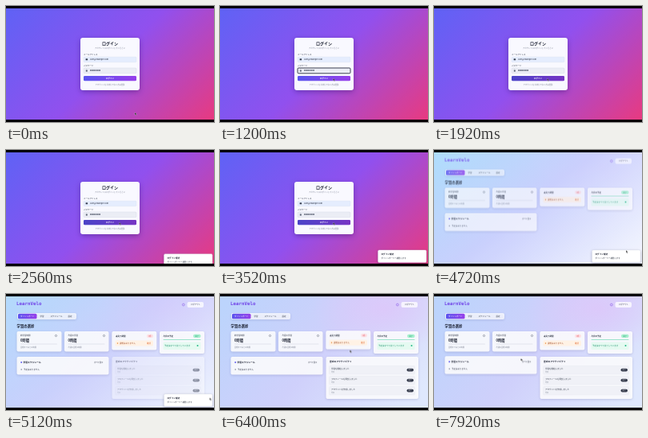
An HTML page for the animation above (8000 ms loop, 260 by 146 pixels).

```html
<!DOCTYPE html>
<html lang="ja">
<head>
<meta charset="utf-8">
<title>LearnVelo</title>
<style>
html, body { margin: 0; width: 100%; height: 100%; overflow: hidden; background: #000; }
svg { display: block; width: 100vw; height: 100vh; font-family: "Noto Sans CJK JP", "Noto Sans CJK", "Noto Sans", sans-serif; }
text { font-size: 2.5px; fill: #333a48; }
.b { font-weight: 700; fill: #171c2c; }
.mute { fill: #7b8190; }
.white { fill: #fff; }
.mid { text-anchor: middle; }
.card { fill: #fff; fill-opacity: .88; }
.shadow { filter: drop-shadow(0 1px 1.5px rgba(50, 50, 110, .2)); }

/* 1% = 80ms */
.anim { animation: 8s linear infinite both; }
.login { animation-name: login; }
.focus { animation-name: focus; }
.press { animation-name: press; }
.home { animation-name: home; }
.wash { animation-name: wash; }
.late { animation-name: late; }
.toast { animation-name: toast; }
.liftA { animation-name: liftA; }
.liftB { animation-name: liftB; }
.pointer { animation-name: pointer; animation-timing-function: ease-in-out; }

@keyframes login { 0%, 47.99% { opacity: 1 } 48%, 100% { opacity: 0 } }
@keyframes focus { 0%, 7.99% { opacity: 0 } 8%, 23.99% { opacity: 1 } 24%, 100% { opacity: 0 } }
@keyframes press { 0%, 23.99% { opacity: 0 } 24%, 100% { opacity: .28 } }
@keyframes home { 0%, 56% { opacity: 0; transform: translateY(2px) } 60%, 100% { opacity: 1; transform: none } }
@keyframes wash { 0%, 56% { opacity: 0 } 74%, 100% { opacity: 1 } }
@keyframes late { 0%, 59% { opacity: 0 } 64% { opacity: .5 } 69%, 100% { opacity: 1 } }
@keyframes toast {
  0%, 30% { transform: translateY(20px); animation-timing-function: ease-out }
  33.5%, 66.5% { transform: none; animation-timing-function: ease-in }
  69%, 100% { transform: translateX(68px) }
}
@keyframes liftA { 0%, 76% { transform: none } 78%, 83% { transform: translateY(-.8px) } 86%, 100% { transform: none } }
@keyframes liftB { 0%, 89% { transform: none } 93%, 100% { transform: translateY(-.8px) } }
@keyframes pointer {
  0%, 1% { transform: translate(161px, 134px) }
  7%, 9% { transform: translate(129px, 81px) }
  14%, 45% { transform: translate(141.5px, 91px) }
  51%, 53% { transform: translate(191.5px, 112px) }
  62%, 67% { transform: translate(254.5px, 130.5px) }
  79%, 82% { transform: translate(162.3px, 70.5px) }
  96%, 100% { transform: translate(108.5px, 81px) }
}
</style>
</head>
<body>
<svg viewBox="0 0 260 146" preserveAspectRatio="none">
  <defs>
    <linearGradient id="night" gradientUnits="userSpaceOnUse" x1="30" y1="-27" x2="230" y2="173">
      <stop offset="0" stop-color="#5f62f5"/><stop offset=".5" stop-color="#9150ee"/><stop offset="1" stop-color="#e83a80"/>
    </linearGradient>
    <linearGradient id="sky" gradientUnits="userSpaceOnUse" x1="40" y1="-27" x2="200" y2="173">
      <stop offset="0" stop-color="#addffc"/><stop offset=".48" stop-color="#c8d0fe"/><stop offset="1" stop-color="#f5f6ff"/>
    </linearGradient>
    <linearGradient id="dusk" gradientUnits="userSpaceOnUse" x1="20" y1="0" x2="220" y2="160">
      <stop offset="0" stop-color="#bcd4fc"/><stop offset=".5" stop-color="#cfd0fb"/><stop offset="1" stop-color="#dfe8fd"/>
    </linearGradient>
    <radialGradient id="violet"><stop offset="0" stop-color="#dcc9fa"/><stop offset="1" stop-color="#dcc9fa" stop-opacity="0"/></radialGradient>
    <linearGradient id="accent"><stop offset="0" stop-color="#5a54ee"/><stop offset="1" stop-color="#963eea"/></linearGradient>
  </defs>

  <rect y="3" width="260" height="140" fill="url(#sky)"/>
  <g class="anim wash">
    <rect y="3" width="260" height="140" fill="url(#dusk)"/>
    <ellipse cx="205" cy="18" rx="90" ry="55" fill="url(#violet)"/>
  </g>

  <g class="anim home">
    <text x="13" y="14.3" font-weight="700" style="font:700 5.8px 'DejaVu Sans Mono',monospace;fill:#7042e8">LearnVelo</text>
    <circle cx="221.8" cy="13.5" r="1.4" fill="none" stroke="#8a5ce8" stroke-width=".6"/>
    <rect x="226.5" y="10" width="20.5" height="7" rx="2" fill="#fff" fill-opacity=".75"/>
    <text class="mid" x="237" y="14.4" style="font-size:2.3px">ログアウト</text>

    <rect class="shadow" x="14" y="24" width="74" height="8" rx="2" fill="#fff" fill-opacity=".75"/>
    <rect x="15" y="24.7" width="23.5" height="6.6" rx="1.6" fill="url(#accent)"/>
    <g class="mid" id="tabs">
      <text class="white" x="26.7" y="28.9">ダッシュボード</text>
      <text x="45" y="28.9">学習</text>
      <text x="63" y="28.9">スケジュール</text>
      <text x="80" y="28.9">設定</text>
    </g>
    <text class="b" x="13.5" y="41.8" style="font-size:4.4px">学習の進捗</text>

    <g class="shadow">
      <rect class="card" x="13.5" y="47" width="56" height="25.5" rx="2"/>
      <text x="18" y="53">総学習時間</text>
      <text class="b" x="18" y="59.5" style="font-size:4.2px">0時間</text>
      <circle cx="62.5" cy="52.5" r="1.1" fill="none" stroke="#555d70" stroke-width=".5"/>
      <rect x="18" y="62.5" width="46" height="1" rx=".5" fill="#e3e5ee"/>
      <text class="mute" x="18" y="68" style="font-size:2.2px">目標まであと10時間</text>
    </g>
    <g class="shadow">
      <rect class="card" x="73" y="47" width="55.5" height="25.5" rx="2"/>
      <text x="77.5" y="53">今週の学習</text>
      <text class="b" x="77.5" y="59.5" style="font-size:4.2px">0時間</text>
      <circle cx="122.5" cy="52.5" r="1.1" fill="none" stroke="#555d70" stroke-width=".5"/>
      <rect x="77.5" y="62.5" width="46" height="1" rx=".5" fill="#e3e5ee"/>
      <text class="mute" x="77.5" y="68" style="font-size:2.2px">今週の目標 5時間</text>
    </g>
    <g class="anim liftA">
      <g class="shadow">
        <rect class="card" x="132.3" y="47" width="56" height="23.5" rx="2"/>
        <text x="137" y="53.7" style="font-weight:700">未完了課題</text>
        <rect x="176" y="50.8" width="8" height="4.2" rx="2" fill="#fde0e4"/>
        <text class="mid" x="180" y="53.8" style="font-size:2.2px;fill:#df4252">0件</text>
        <rect x="136.5" y="58.5" width="47.5" height="7" rx="1.2" fill="#fff2e5"/>
        <circle cx="139.5" cy="62" r=".8" fill="#e98a3d"/>
        <text x="142" y="62.9" style="fill:#a7552c">課題はありません</text>
        <text x="176" y="62.9" style="fill:#e36e35">確認</text>
      </g>
    </g>
    <g class="shadow">
      <rect class="card" x="192" y="47" width="56" height="28" rx="2"/>
      <text x="196.5" y="53.7" style="font-weight:700">今日の予定</text>
      <rect x="234" y="50.8" width="9.5" height="4.2" rx="2" fill="#a6f0ce"/>
      <text class="mid" x="238.7" y="53.8" style="font-size:2.2px;fill:#087d59">完了</text>
      <rect x="196.5" y="57.2" width="47" height=".9" rx=".4" fill="#7ddcba"/>
      <rect x="196.5" y="60.5" width="47" height="9.5" rx="1.2" fill="#e5faf1"/>
      <text x="198" y="66" style="fill:#148f68">予定はすべて完了しています</text>
      <circle cx="239.5" cy="65" r="1" fill="#26b987"/>
    </g>

    <g class="anim liftB">
      <g class="shadow">
        <rect class="card" x="13.5" y="79" width="115" height="22.5" rx="2"/>
        <circle cx="19.2" cy="86" r=".9" fill="#5a54ee"/>
        <text class="b" x="21.5" y="87" style="font-size:2.8px">学習スケジュール</text>
        <text x="110" y="87" style="font-size:2.3px">すべて表示</text>
        <circle cx="19.2" cy="95" r=".7" fill="#697084"/>
        <text x="22" y="96">予定はありません</text>
      </g>
    </g>

    <g class="anim late">
      <g class="shadow">
        <rect class="card" x="132.5" y="79" width="115.5" height="53" rx="2"/>
        <text class="b" x="137" y="86" style="font-size:2.8px">最近のアクティビティ</text>
        <g id="rows"></g>
      </g>
    </g>
  </g>

  <g class="anim login">
    <rect y="3" width="260" height="140" fill="url(#night)"/>
    <rect x="93" y="40" width="74" height="66" rx="3" fill="#f9f9ff" style="filter:drop-shadow(0 2px 3px rgba(30,10,80,.35))"/>
    <text class="b mid" x="130" y="49" style="font-size:5px">ログイン</text>
    <text class="mute mid" x="130" y="54" style="font-size:2.4px">アカウントにログインしてください</text>
    <text x="97" y="61.8">メールアドレス</text>
    <rect x="97" y="64" width="66" height="6.8" rx="1.2" fill="#e5edfe" stroke="#d3d9ea" stroke-width=".3"/>
    <rect x="99.6" y="66.3" width="2.5" height="2" rx=".3" fill="#394052"/>
    <text x="105" y="68.4" style="fill:#1c2336">user@example.com</text>
    <text x="97" y="75.8">パスワード</text>
    <rect x="97" y="78" width="66" height="6.8" rx="1.2" fill="#ebedf5" stroke="#c9cddb" stroke-width=".3"/>
    <rect x="99.8" y="80.9" width="2" height="1.7" rx=".3" fill="#525a6c"/>
    <path d="M100.2 81v-.7q.6-.8 1.2 0v.7" fill="none" stroke="#525a6c" stroke-width=".4"/>
    <text x="105" y="82.4" style="fill:#5d6475;font-size:2.2px">●●●●●●</text>
    <rect class="anim focus" x="97" y="78" width="66" height="6.8" rx="1.2" fill="none" stroke="#15182a" stroke-width=".8"/>
    <rect x="97" y="88" width="66" height="6.3" rx="1.4" fill="url(#accent)"/>
    <rect class="anim press" x="97" y="88" width="66" height="6.3" rx="1.4" fill="#251b66"/>
    <text class="white mid" x="130" y="92.1" style="font-weight:700">ログイン</text>
    <text class="mute mid" x="130" y="99.8" style="font-size:2.3px">アカウントをお持ちでない方は登録</text>
  </g>

  <g class="anim toast">
    <rect x="197.5" y="126" width="60.5" height="15.5" rx="1.5" fill="#fff" stroke="#dfe2ea" stroke-width=".4" style="filter:drop-shadow(0 1px 1.5px rgba(20,20,60,.3))"/>
    <text class="b" x="201.5" y="132.4" style="font-size:2.6px">ログイン成功</text>
    <text x="201.5" y="136.6" style="font-size:2.4px">ダッシュボードへ移動します</text>
  </g>

  <path class="anim pointer" d="M0 0V3.1L.8 2.5 1.4 3.7 2 3.4 1.4 2.3H2.4Z" fill="#111" stroke="#fff" stroke-width=".25"/>
  <path d="M0 0H260V3H0ZM0 143H260V146H0Z"/>
</svg>
<script>
const activities = ["学習を開始しました", "プロフィールを更新しました", "アカウントを作成しました"];
document.getElementById("rows").innerHTML = activities.map((label, i) => {
  const y = 90.5 + i * 13;
  return `<rect x="136.5" y="${y}" width="107" height="10.5" rx="1.2" fill="#f0f1f7" stroke="#dfe2ec" stroke-width=".3"/>
    <text x="139" y="${y + 4.2}">${label}</text>
    <text class="mute" x="139" y="${y + 8}" style="font-size:2.1px">今日</text>
    <rect x="233.5" y="${y + 3.2}" width="8.5" height="3.8" rx="1.9" fill="#343a4b"/>
    <text class="mid white" x="237.7" y="${y + 5.9}" style="font-size:2.1px">完了</text>`;
}).join("");
</script>
</body>
</html>
```
